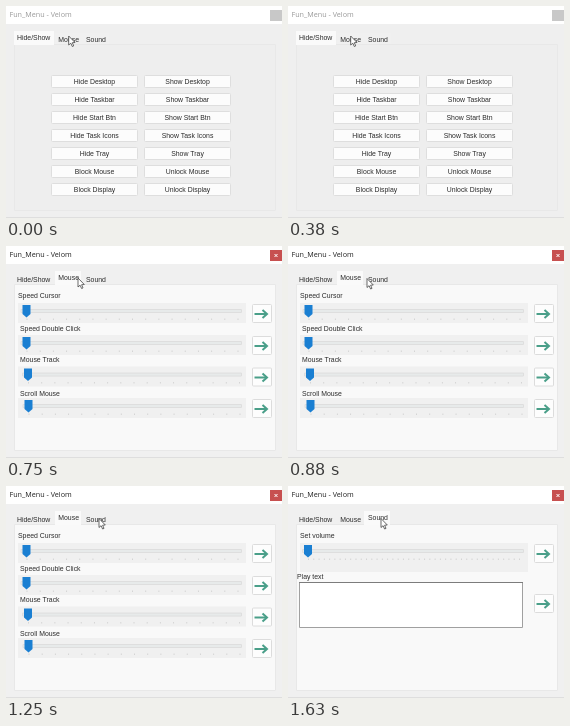
These frames come from a looping animation (276 by 212 pixels, 1870 ms). An HTML page with a canvas:

```html
<!DOCTYPE html>
<html lang="en">
<head>
<meta charset="utf-8">
<title>Fun_Menu</title>
<style>
  html, body { margin: 0; width: 100%; height: 100%; overflow: hidden; background: #f0f0f0; }
  canvas { display: block; width: 276px; height: 212px; }
</style>
</head>
<body>
<canvas id="stage"></canvas>
<script>
const W = 276, H = 212, LOOP = 1870;
const MOUSE_AT = 500, SOUND_AT = 1630;
const UI = '6.9px "Liberation Sans", Arial, sans-serif';
const TITLE = '7.2px "Open Sans", sans-serif';

const canvas = document.getElementById('stage');
const ctx = canvas.getContext('2d');
const ratio = window.devicePixelRatio || 1;
canvas.width = W * ratio;
canvas.height = H * ratio;
ctx.scale(ratio, ratio);

// Pointer tip over time: [ms, x, y], held until the next entry.
const pointerPath = [
  [0, 62.7, 30], [500, 63, 32], [750, 72, 32], [880, 79, 32.5],
  [1000, 83, 33], [1130, 85.5, 33], [1250, 93, 32.5]
];

const tabs = [['Hide/Show', 8, 41, 11], ['Mouse', 49, 27, 52.3], ['Sound', 76, 27, 80]];
const targets = ['Desktop', 'Taskbar', 'Start Btn', 'Task Icons', 'Tray'];
const buttonRows = targets.map(name => ['Hide ' + name, 'Show ' + name])
  .concat(['Mouse', 'Display'].map(name => ['Block ' + name, 'Unlock ' + name]));
const sliders = [
  ['Speed Cursor', 12, 51.8, 20.5, 59], ['Speed Double Click', 14, 85, 20.5, 91],
  ['Mouse Track', 14, 116.4, 22, 122.5], ['Scroll Mouse', 14, 149.5, 22.5, 154]
];

function rect(x, y, w, h, fill) {
  ctx.fillStyle = fill;
  ctx.fillRect(x, y, w, h);
}

function box(x, y, w, h, fill, border, radius = 0) {
  ctx.beginPath();
  ctx.roundRect(x + .5, y + .5, w - 1, h - 1, radius);
  ctx.fillStyle = fill;
  ctx.fill();
  ctx.strokeStyle = border;
  ctx.lineWidth = 1;
  ctx.stroke();
}

function text(str, x, y, align = 'left', font = UI, color = '#2c2c2c') {
  ctx.font = font;
  ctx.textAlign = align;
  ctx.fillStyle = color;
  ctx.fillText(str, x, y);
}

function line(points, color, width) {
  ctx.beginPath();
  points.forEach(([x, y]) => ctx.lineTo(x, y));
  ctx.strokeStyle = color;
  ctx.lineWidth = width;
  ctx.stroke();
}

function polygon(points, fill) {
  ctx.beginPath();
  points.forEach(([x, y]) => ctx.lineTo(x, y));
  ctx.closePath();
  ctx.fillStyle = fill;
  ctx.fill();
}

function drawWindow(active, page) {
  rect(0, 0, W, H, active ? '#f0f0f0' : '#efefef');
  rect(0, 0, W, 18, '#fff');
  rect(0, 211, W, 1, '#dedede');
  text('Fun_Menu - Velom', 3.5, 11, 'left', TITLE, active ? '#222' : '#999');
  rect(264, 4, 12, 11, active ? '#c75050' : '#c8c8c8');
  if (active) {
    line([[268.5, 8], [271.5, 11]], '#fff', 1);
    line([[271.5, 8], [268.5, 11]], '#fff', 1);
  }

  box(8, 38, 262, 167, active ? '#f9f9f9' : '#eee', '#e8e8e8');
  tabs.forEach(([name, x, w, textX], i) => {
    if (i === page) {
      rect(x, 25, w - 1, 14, '#fafafa');
      text(name, textX, 33.8);
    } else {
      rect(x, 27, w, 11, '#f0f0f0');
      text(name, textX, 35.5);
    }
  });
}

function drawButtons() {
  buttonRows.forEach((row, r) => row.forEach((label, c) => {
    const x = 45 + c * 93, y = 69 + r * 18;
    box(x, y, 87, 13, '#fcfcfc', '#dedede', 1);
    text(label, x + 43.5, y + 9, 'center');
  }));
}

function drawArrowButton(y) {
  const green = '#4a9f89';
  box(246, y - 10, 20, 19, '#fdfdfd', '#dcdcdc', 1);
  line([[248.5, y], [260.5, y]], green, 2);
  line([[256.5, y - 4], [261, y], [256.5, y + 4]], green, 2);
}

function drawSlider(x, y, ticks) {
  rect(12, y - 2, 228, ticks > 20 ? 29 : 20, '#f0f0f0');
  box(x - 6, y + 4, 242 - x, 4, '#e7eaea', '#dedede');
  for (let i = 0; i < ticks; i++)
    rect(x + i * 211 / (ticks - 1), y + 13.5, 1, 1.5, '#d4d4d4');
  polygon([[x - 4, y], [x + 4, y], [x + 4, y + 9], [x, y + 12.5], [x - 4, y + 9]], '#1a7fd2');
}

function drawMousePage() {
  sliders.forEach(([label, textX, baseline, x, y]) => {
    drawSlider(x, y, 17);
    text(label, textX, baseline);
    drawArrowButton(y + 9);
  });
}

function drawSoundPage() {
  text('Set volume', 12, 51.5);
  drawSlider(20, 59, 41);
  drawArrowButton(68);
  text('Play text', 9, 92.5);
  box(11, 96, 224, 46, '#fff', '#a0a0a0');
  line([[11, 96.5], [235, 96.5]], '#7c7c7c', 1);
  drawArrowButton(118);
}

function drawPointer(x, y) {
  const shape = [[0, 0], [0, 9], [2.1, 7.2], [3.6, 10.5], [5, 9.9], [3.6, 6.7], [6.3, 6.5]]
    .map(([dx, dy]) => [x + dx, y + dy]);
  polygon(shape, '#fff');
  line([...shape, shape[0]], '#444', .8);
}

function frame(now) {
  const t = now % LOOP;
  const page = t < MOUSE_AT ? 0 : t < SOUND_AT ? 1 : 2;
  drawWindow(page > 0, page);
  [drawButtons, drawMousePage, drawSoundPage][page]();
  const [, x, y] = pointerPath.filter(([start]) => start <= t).pop();
  drawPointer(x, y);
}

const start = performance.now();
function tick() {
  frame(performance.now() - start);
  requestAnimationFrame(tick);
}
tick();
</script>
</body>
</html>
```
